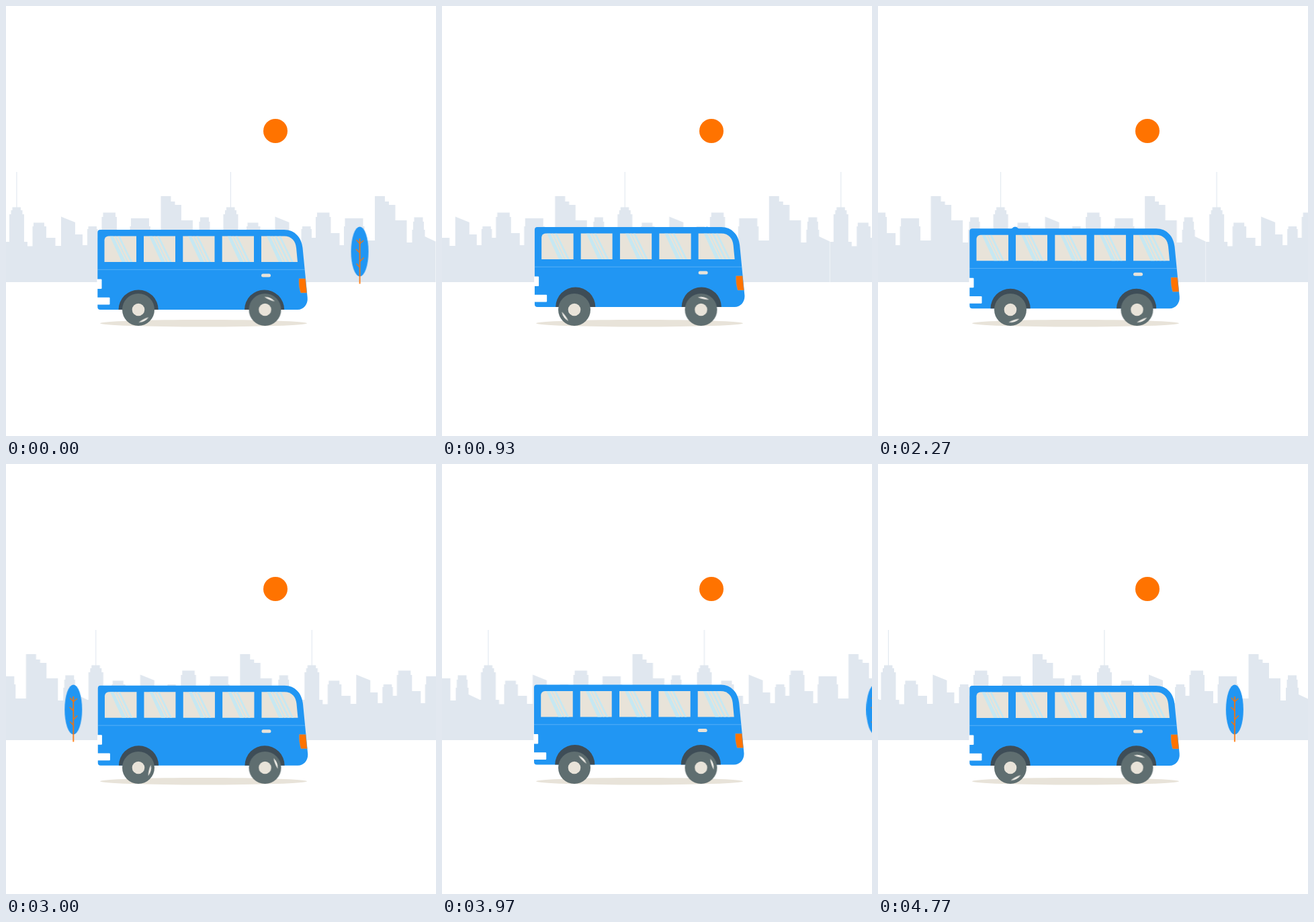
Write an HTML page that moves like this. It is 640x640 px and loops after 4800 ms.

```html
<!DOCTYPE html>
<html lang="en">
<head>
<meta charset="utf-8">
<title>Bus ride</title>
<style>
  @property --lift { syntax: "<length>"; inherits: false; initial-value: 0px; }
  @property --sway { syntax: "<length>"; inherits: false; initial-value: 0px; }
  @property --up { syntax: "<number>"; inherits: false; initial-value: 0; }

  html, body { margin: 0; width: 100%; height: 100%; overflow: hidden; background: #fff; }
  svg { display: block; width: 100%; height: 100%; }

  .blue { fill: #2196f3; }
  .orange { fill: #ff7300; }
  .cream { fill: #e8e3d9; }
  .white { fill: #fff; }

  #city { fill: #e0e7ef; animation: city 4.8s linear infinite; }
  #tree { animation: tree 4.8s linear infinite; }
  #bus {
    transform: translate(var(--sway), calc(var(--lift) * var(--up) * -1));
    animation: lift 4.8s linear infinite,
               sway 4.8s cubic-bezier(.37, 0, .63, 1) infinite,
               rattle 80ms step-end -10ms infinite;
  }
  .spin { animation: spin .96s linear infinite; }
  .coast { animation: coast 4.8s cubic-bezier(.167, .167, .667, 1) infinite; }

  @keyframes city { to { transform: translateX(-321px); } }
  @keyframes tree {
    0% { transform: translateX(526.7px); }
    80.16% { transform: translateX(-20px); }
    80.161% { transform: translateX(662px); }
    100% { transform: translateX(526.7px); }
  }
  @keyframes lift {
    0%, 100% { --lift: 3px; }
    19.2%, 32.5% { --lift: 4px; }
    47.5% { --lift: 1.7px; }
    62.5% { --lift: 3.2px; }
    82.5% { --lift: 4.5px; }
  }
  @keyframes sway {
    0%, 50%, 100% { --sway: 0px; }
    25% { --sway: 1.85px; }
    75% { --sway: .9px; }
  }
  @keyframes rattle { 0% { --up: 0; } 50% { --up: 1; } }
  @keyframes spin { from { transform: rotate(-67deg); } to { transform: rotate(293deg); } }
  @keyframes coast { from { transform: rotate(62deg); } to { transform: rotate(1862deg); } }
</style>
</head>
<body>
<svg viewBox="0 0 640 640">
  <defs>
    <g id="block">
      <path d="M0 411V351H5V310H7.5V304H9.5V299.5H22V304H24.5V310H27V351H32V357.5H39.5V328H41V322.5H57V328H60V345H73.5V357H82
        V313.5L103 322V340H114V356H121V332H122.5V328H135V332H136.5V345H142.5V314H144.5V307.5H163V314H165V338H178V356
        H184.5V328H186V316H213V328H215V349H230.5V283H245.5V291H251.5V296H261V319H278V352H286V333H287.5V321H289V314.5
        H302V321H303.5V333H305V343L321 350.5V411Z"/>
      <rect x="15.4" y="247" width="1.1" height="53"/>
    </g>
    <path id="glare" d="M8 0H13L32 39H26ZM15.5 0H17L36 39H34ZM20 0H23L42 39H39Z" fill="#c6e8f2"/>
    <g id="tyre">
      <circle r="24" fill="#5f6e70"/>
      <circle r="9.3" class="cream"/>
    </g>
    <path id="shine" d="M17 -8.5A19 19 0 0 1 17 8.5Q15.5 0 17 -8.5Z" fill="#f1eee8"/>
  </defs>

  <circle class="orange" cx="401" cy="186" r="18"/>

  <g id="city">
    <use href="#block"/>
    <use href="#block" x="318.5"/>
    <use href="#block" x="640"/>
  </g>

  <g id="tree">
    <ellipse class="blue" cy="365.5" rx="13" ry="37"/>
    <path d="M0 346V413.5" fill="none" stroke="#ff7300" stroke-width="1.7"/>
    <path d="M-5 348L0 354L5.5 349M-5.5 362L0 367.500M-5 383.500L0 389M6 374.500L0 380.500" fill="none" stroke="#ff7300" stroke-width="1.2"/>
  </g>

  <ellipse class="cream" cx="294" cy="472.2" rx="154" ry="5.3"/>

  <g id="bus">
    <path class="blue" d="M140.300 333H414C430 333 440 345 441.500 360L448.700 434C449.700 444 443 452 434 452H140.300A4 4 0 0 1 136.300 448V337A4 4 0 0 1 140.300 333Z"/>
    <path d="M136.300 392.300H444.500" stroke="#fff" stroke-opacity=".3" stroke-width=".8"/>
    <g class="cream">
      <path d="M146.500 381V348.500A6 6 0 0 1 152.500 342.500H194V381Z"/>
      <path d="M205 342.500H252V381H205ZM263.300 342.500H310.500V381H263.300ZM321.700 342.500H369V381H321.700Z"/>
      <path d="M380 342.500H414C425 342.500 431 350 432 360L434 381H380Z"/>
      <rect x="380" y="398.500" width="14" height="5" rx="2.500"/>
    </g>
    <svg y="342.500" height="38.500" width="640">
      <use href="#glare" x="146.500"/>
      <use href="#glare" x="205"/>
      <use href="#glare" x="263.300"/>
      <use href="#glare" x="321.700"/>
      <use href="#glare" x="380"/>
      <path d="M406 0H409L428 39H425Z" fill="#c6e8f2"/>
    </svg>
    <path class="white" d="M135.500 406.500H141.500A1 1 0 0 1 142.500 407.500V420A1 1 0 0 1 141.500 421H135.500ZM135.500 433.800H153.500A1 1 0 0 1 154.500 434.800V443.500A1 1 0 0 1 153.500 444.500H135.500Z"/>
    <path class="orange" d="M436 405.700H445.700L447.800 427H438.500Q435.300 417 436 405.700Z" stroke="#8fa6b5" stroke-width=".4"/>
    <path d="M167.500 452A29.600 29.600 0 0 1 226.700 452ZM355 452A29.600 29.600 0 0 1 414.200 452Z" fill="#3e4d57"/>
  </g>

  <g transform="translate(197 452)">
    <use href="#tyre"/>
    <use href="#shine" class="coast"/>
  </g>
  <g transform="translate(385.500 452)">
    <use href="#tyre"/>
    <use href="#shine" class="spin"/>
  </g>
</svg>
</body>
</html>
```
